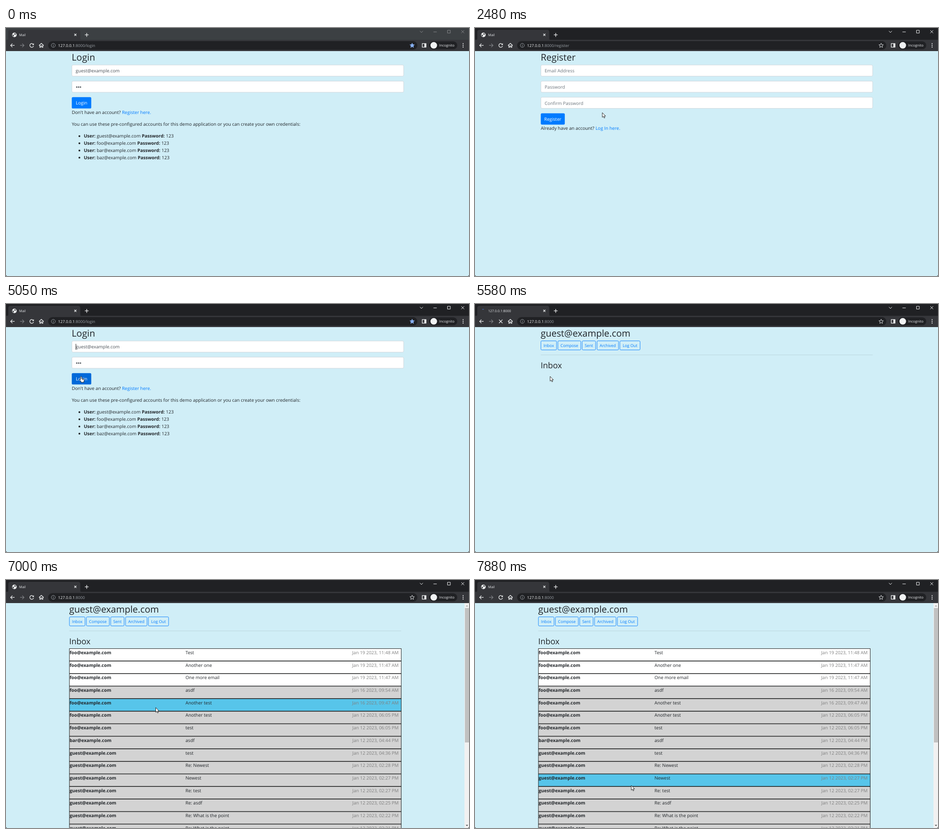
Write an HTML page that moves like this. It is 1022 px wide and 548 px high and loops after 8000 ms.

```html
<!DOCTYPE html>
<html lang="en">
<head>
<meta charset="utf-8">
<title>Mail</title>
<style>
  html, body { margin: 0; width: 100%; height: 100%; overflow: hidden; background: #d0eef7; }
  svg { display: block; width: 1022px; height: 548px; }
  text { font-family: "Open Sans", "Noto Sans", sans-serif; font-size: 10px; fill: #212529; text-rendering: geometricPrecision; }
  .b { font-weight: 700; }
  .h { font-weight: 500; font-size: 20.4px; }
  .ui { font-size: 7.45px; fill: #e8eaed; }
  .link { fill: #007bff; }
  .link.on { fill: #0056b3; text-decoration: underline; }
  .line { fill: none; stroke: #f1f3f4; stroke-width: 1.3; }
  .field { fill: #fff; stroke: #ced4da; stroke-width: .9; }
</style>
</head>
<body>
<svg id="stage" viewBox="0 0 1022 548"></svg>
<script>
const LOOP = 8000, ROW_TOP = 151.3, PITCH = 27.72;
const $ = id => document.getElementById(id);
const text = (x, y, s, attrs = '') => `<text x="${x}" y="${y}" ${attrs}>${s}</text>`;
const rect = (x, y, w, h, attrs = '') => `<rect x="${x}" y="${y}" width="${w}" height="${h}" ${attrs}/>`;
const path = (d, attrs = 'class="line"') => `<path d="${d}" ${attrs}/>`;
const circle = (x, y, r, attrs = '') => `<circle cx="${x}" cy="${y}" r="${r}" ${attrs}/>`;
const group = (id, body, attrs = '') => `<g id="${id}" ${attrs}>${body}</g>`;
const field = (y, label, color) => rect(145.5, y, 732.3, 24.6, 'rx="2.6" class="field"') +
  text(153.8, y + 16.6, label, `style="fill:${color}"`);
const button = (y, w, label) => rect(145.2, y, w, 25, 'rx="2.6" fill="#007bff" class="btn"') +
  text(145.2 + w / 2, y + 16.4, label, 'text-anchor="middle" style="fill:#fff"');

// Browser window
function starPath(cx, cy, r) {
  const points = Array.from({ length: 10 }, (_, i) => {
    const a = i * Math.PI / 5 - Math.PI / 2, d = i % 2 ? r * .45 : r;
    return `${(cx + d * Math.cos(a)).toFixed(2)},${(cy + d * Math.sin(a)).toFixed(2)}`;
  });
  return `M${points.join('L')}Z`;
}

const browser =
  rect(0, 0, 1022, 27, 'id="strip"') +
  rect(0, 26, 1022, 25, 'fill="#35363a"') +
  path('M1 27Q5 27 5 23V9Q5 4 10 4H159Q164 4 164 9V23Q164 27 168 27Z', 'fill="#35363a"') +
  group('globe', circle(18.5, 15.3, 5, 'fill="#f1f3f4"') +
    path('M14.6 14.2L17.2 15.6L17.6 18.2L16 18.6Q14 17 14.6 14.2ZM18.4 11.6L21.8 12.6L20.6 15.2L18.6 14.4Z', 'fill="#35363a"')) +
  path('M18 11.2A4 4 0 0 1 21 13', 'id="spinner" fill="none" stroke="#4a6fc0" stroke-width="1.2"') +
  group('halfIcon', path('M15 15.5V14L16.5 12H20.5L21.5 15.5Z', 'fill="#e8eaed"') +
    rect(15, 16.5, 7, 1.6, 'fill="#5b86d8"')) +
  text(29, 18, '', 'id="title" class="ui"') +
  path('M150.8 12.8L155.4 17.4M155.4 12.8L150.8 17.4M174 15.2H182.4M178.2 11V19.4') +
  group('controls', path('M913.6 6.6L917 10L920.4 6.6M943.5 8.7H950.8M974.5 5H980.8V11.2H974.5ZM1005 5L1011.4 11.4M1011.4 5L1005 11.4',
    'fill="none" stroke-width="1"')) +
  path('M19 38.4H10.4M14.2 34.4L10.2 38.4L14.2 42.4') +
  path('M31 38.4H39.6M35.8 34.4L39.8 38.4L35.8 42.4', 'fill="none" stroke="#7f8185" stroke-width="1.3"') +
  group('reload', path('M60.4 36.2A4.2 4.2 0 1 0 60.9 39.6') +
    path('M61.5 33.8V37.6H57.7Z', 'fill="#f1f3f4"')) +
  path('M53 34.6L60.6 42.2M60.6 34.6L53 42.2', 'id="stop" class="line"') +
  path('M72.8 38.8L78 34L83.2 38.8M74.6 37.5V42.6H76.7V39.6H79.3V42.6H81.4V37.5') +
  rect(93, 29, 815, 19, 'rx="9.5" fill="#202124"') +
  circle(104.4, 38.4, 4.4, 'fill="none" stroke="#9aa0a6"') +
  path('M104.4 36V37M104.4 37.8V41', 'stroke="#9aa0a6" stroke-width="1"') +
  text(115, 41.5, '127.0.0.1<tspan fill="#9aa0a6">:8000<tspan id="url"></tspan></tspan>',
    'style="font-size:8.7px;fill:#f1f3f4"') +
  path(starPath(896.5, 38.7, 5.2), 'id="star" stroke-width="1" stroke-linejoin="round"') +
  rect(918.8, 34.4, 8.2, 8, 'class="line"') + rect(923.5, 34.4, 4, 8, 'fill="#f1f3f4"') +
  rect(934, 29.5, 62, 17.5, 'rx="8.7" fill="#202124"') +
  circle(944.2, 38.3, 7.3, 'fill="#f1f3f4"') +
  text(956, 41.2, 'Incognito', 'class="ui" style="font-size:7.8px"') +
  [34.6, 38.4, 42.2].map(y => circle(1009, y, 1.1, 'fill="#f1f3f4"')).join('');

// Pages
const dots = [156.2, 160.3, 164.4].map(x => circle(x, 130.6, 1.5, 'fill="#495057"')).join('');
const accounts = ['guest', 'foo', 'bar', 'baz'].map((name, i) => {
  const y = 242.2 + i * 15.85;
  return circle(162, y - 3.2, 2, 'fill="#212529"') + text(171.7, y,
    `<tspan class="b">User:</tspan> ${name}@example.com <tspan class="b">Password:</tspan> 123`);
}).join('');

const login =
  text(145, 72, 'Login', 'class="h"') + field(81.8, 'guest@example.com', '#495057') + field(117.4, '', '#495057') + dots +
  rect(153.8, 88, 1, 13, 'id="caret" fill="#222"') +
  button(152.8, 43, 'Login') +
  text(145.2, 189.5, 'Don\'t have an account? <tspan class="link">Register here.</tspan>') +
  text(145.2, 215.9, 'You can use these pre-configured accounts for this demo application or you can create your own credentials:') +
  accounts;

const register =
  text(145, 72, 'Register', 'class="h"') +
  ['Email Address', 'Password', 'Confirm Password'].map((s, i) => field(81.8 + i * 35.6, s, '#6c757d')).join('') +
  button(188.4, 53, 'Register') +
  text(145.2, 225, 'Already have an account? <tspan class="link">Log In here.</tspan>');

const menu = [['Inbox', 145.5, 34.5], ['Compose', 183, 50.6], ['Sent', 236.6, 29.6], ['Archived', 269.4, 47.4], ['Log Out', 319.8, 44.6]]
  .map(([s, x, w]) => rect(x, 81.5, w, 20, 'rx="2" fill="none" stroke="#007bff" stroke-width=".9"') +
    text(x + w / 2, 95.1, s, 'text-anchor="middle" class="link" style="font-size:8.8px"')).join('');

const mails = [
  ['foo', 'Test', '19 2023, 11:48 AM'], ['foo', 'Another one', '19 2023, 11:47 AM'],
  ['foo', 'One more email', '19 2023, 11:47 AM'], ['foo', 'asdf', '16 2023, 09:54 AM'],
  ['foo', 'Another test', '16 2023, 09:47 AM'], ['foo', 'Another test', '12 2023, 06:05 PM'],
  ['foo', 'test', '12 2023, 06:05 PM'], ['bar', 'asdf', '12 2023, 04:44 PM'],
  ['guest', 'test', '12 2023, 04:36 PM'], ['guest', 'Re: Newest', '12 2023, 02:28 PM'],
  ['guest', 'Newest', '12 2023, 02:27 PM'], ['guest', 'Re: test', '12 2023, 02:27 PM'],
  ['guest', 'Re: asdf', '12 2023, 02:25 PM'], ['guest', 'Re: What is the point', '12 2023, 02:22 PM'],
  ['guest', 'Re: What is the point', '12 2023, 02:21 PM']
].map(([from, subject, date], i) => {
  const y = ROW_TOP + i * PITCH;
  return rect(140, y + .3, 732.4, PITCH - .6, 'class="row" stroke="#1c1c1c" stroke-width="1"') +
    text(140.4, y + 12.5, from + '@example.com', 'class="b"') + text(396.3, y + 12.5, subject) +
    text(866.6, y + 12.5, 'Jan ' + date, 'text-anchor="end" style="fill:#808080"');
}).join('');

const inbox =
  group('head', text(145, 72, 'guest@example.com', 'class="h"') + menu +
    rect(145.2, 112, 732.6, 1, 'fill="#000" opacity=".1"') +
    text(145, 142, 'Inbox', 'class="h" style="font-size:18px"')) +
  group('list', mails + rect(1012, 51, 10, 497, 'fill="#f1f1f1"') +
    rect(1013, 62, 9, 297, 'fill="#c1c1c1"') +
    path('M1014.8 58.6L1017.5 55.8L1020.2 58.6Z', 'fill="#a3a3a3"') +
    path('M1014.8 541L1017.5 543.8L1020.2 541Z', 'fill="#505050"'));

const status = group('status',
  path('', 'id="statusBox" fill="#35363a" stroke="#5a5c60" stroke-width=".7"') +
  text(3, 544, '', 'id="statusText" class="ui"'));

const outline = 'stroke="#111" stroke-width=".9" stroke-linejoin="round"';
const pointers =
  group('arrow', path('M0 0V10.4L2.4 8.2L4.1 12L5.8 11.2L4.2 7.6H7.3Z', `fill="#fff" ${outline}`)) +
  group('hand', path('M-1 .8Q.3 -1 1.5 .8V5L6 5.8Q7.4 6.2 7.2 8L6.4 11V13H0V11.2L-3.3 7.4Q-3.4 5.6 -1 7.2Z', `fill="#fff" ${outline}`) +
    path('M3 5.6V7.4M4.9 6V7.6', outline)) +
  group('beam', ['stroke="#fff" stroke-width="2" opacity=".6"', 'stroke="#222" stroke-width=".9"']
    .map(a => path('M-2.6 -5.5H-.6L0 -5L.6 -5.5H2.6M0 -5V5M-2.6 5.5H-.6L0 5L.6 5.5H2.6', 'fill="none" ' + a)).join(''));

$('stage').innerHTML = rect(0, 0, 1022, 548, 'fill="#d0eef7"') +
  group('login', login) + group('register', register) + group('inbox', inbox) + browser + status +
  path('M0 545Q0 548 3 548H0ZM1022 545Q1022 548 1019 548H1022Z', 'fill="#111"') +
  group('pointer', pointers);

// Pointer path: time, x, y, shape held until the next entry
const moves = [
  [330, 774, 480, 'arrow'], [600, 420, 195, 'arrow'], [760, 268, 92, 'beam'], [850, 255, 84, 'beam'],
  [920, 262, 120, 'arrow'], [1080, 275, 181, 'hand'], [1140, 277, 183, 'hand'], [1210, 281, 187, 'hand'],
  [2170, 281, 187, 'arrow'], [2810, 281, 187, 'arrow'], [3040, 199, 157, 'beam'], [3160, 220, 178, 'arrow'],
  [3420, 298, 223, 'hand'], [3560, 293, 217, 'hand'], [3880, 293, 217, 'beam'], [4020, 293, 217, 'beam'],
  [4110, 265, 205, 'arrow'], [4370, 172, 170, 'hand'], [4440, 170, 167, 'hand'], [4650, 165.5, 160, 'hand'],
  [5450, 165.5, 160, 'arrow'], [5850, 166.5, 160, 'beam'], [6520, 166.5, 160, 'beam'], [6590, 185, 170, 'beam'],
  [6660, 220, 187, 'arrow'], [6870, 322, 253, 'arrow'], [7070, 335, 297, 'arrow'], [7340, 335, 297, 'arrow'],
  [7600, 340, 354, 'arrow'], [7880, 345, 454, 'arrow']
];

function pointerAt(t) {
  const i = moves.findLastIndex(m => m[0] <= t);
  if (i < 0) return null;
  const [t0, x0, y0, shape] = moves[i], [t1, x1, y1] = moves[i + 1] || moves[i];
  const k = t1 > t0 ? (t - t0) / (t1 - t0) : 0;
  return { x: x0 + (x1 - x0) * k, y: y0 + (y1 - y0) * k, shape };
}

const show = (id, on) => $(id).style.display = on ? '' : 'none';
const within = (t, a, b) => t >= a && t < b;
const rows = [...document.querySelectorAll('.row')];
const links = ['login', 'register'].map(id => $(id).querySelector('.link'));
const loginButton = $('login').querySelector('.btn');

function draw(t) {
  const page = t >= 5450 ? 'inbox' : within(t, 2170, 3880) ? 'register' : 'login';
  for (const id of ['login', 'register', 'inbox']) show(id, id === page);

  const active = t >= 1820, listed = t >= 5850;
  $('strip').setAttribute('fill', active ? '#202124' : '#3c4043');
  $('controls').setAttribute('stroke', active ? '#f1f3f4' : '#85878a');
  $('title').textContent = within(t, 5450, 5780) ? '127.0.0.1:8000' : 'Mail';
  $('url').textContent = page === 'inbox' ? '' : '/' + page;
  $('star').setAttribute('fill', page === 'login' ? '#8ab4f8' : 'none');
  $('star').setAttribute('stroke', page === 'login' ? '#8ab4f8' : '#dfe1e5');

  const stopping = within(t, 2030, 2300) || within(t, 3690, 3910) || within(t, 5250, 5780);
  const half = within(t, 2300, 2370) || within(t, 3910, 4020);
  show('stop', stopping);
  show('reload', !stopping);
  show('spinner', stopping);
  show('halfIcon', half);
  show('globe', !stopping && !half);
  $('spinner').setAttribute('transform', `rotate(${(t - 5580) * .36 - 30} 18.5 15.3)`);

  const target = within(t, 1410, 2240) ? 'register' : within(t, 3620, 4300) ? 'login' : '';
  show('status', target);
  $('status').style.opacity = target === 'register' ? Math.min(1, .5 + (t - 1410) / 140) : 1;
  $('statusText').textContent = '127.0.0.1:8000/' + target;
  $('statusBox').setAttribute('d', `M0 534.4H${target === 'login' ? 75 : 84}q2.5 0 2.5 2.5V548H0Z`);

  show('caret', within(t, 3880, 4510) || within(t, 5050, 5450));
  show('list', listed);
  $('head').setAttribute('transform', `translate(${listed ? -5.5 : 0} 0)`);

  const p = pointerAt(t);
  show('pointer', p);
  if (p) {
    $('pointer').setAttribute('transform', `translate(${p.x} ${p.y})`);
    for (const id of ['arrow', 'hand', 'beam']) show(id, id === p.shape);
  }
  links[0].classList.toggle('on', within(t, 1080, 2170));
  links[1].classList.toggle('on', within(t, 3420, 3880));
  loginButton.setAttribute('fill', within(t, 4370, 5450) ? '#0069d9' : '#007bff');

  // The highlight trails the pointer slightly
  const late = pointerAt(t - 60);
  const hovered = late ? Math.floor((late.y - ROW_TOP) / PITCH) : -1;
  rows.forEach((r, i) => r.setAttribute('fill', i === hovered ? '#57c5ea' : i < 3 ? '#fff' : '#d3d3d3'));
}

const start = performance.now();
function tick() {
  draw((performance.now() - start) % LOOP);
  requestAnimationFrame(tick);
}
tick();
</script>
</body>
</html>
```
